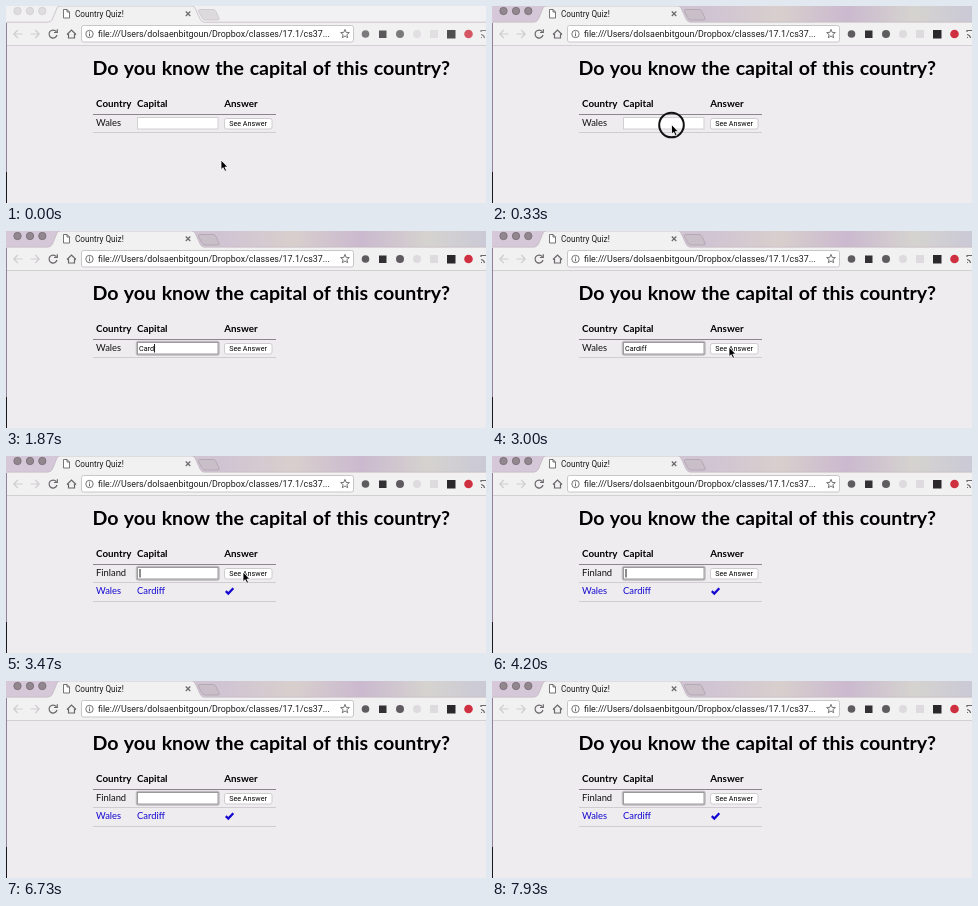
An HTML page that plays this animation: 480x197 px, repeating every 8 s.

```html
<!DOCTYPE html>
<html lang="en">
<head>
<meta charset="utf-8">
<title>Country Quiz!</title>
<style>
html, body { margin: 0; width: 100%; height: 100%; overflow: hidden; background: #eeecef; }
svg { display: block; width: 480px; height: 197px; }
text { white-space: pre; }
.ui { font-family: Roboto, "Liberation Sans", sans-serif; fill: #1c1c1c; }
.page { font: 9.4px Lato, "Open Sans", sans-serif; fill: #111; }
.head { font-weight: 700; font-size: 9.8px; fill: #000; }
.title { font-weight: 700; font-size: 19.58px; word-spacing: .9px; fill: #000; }
.small { font-size: 7.2px; fill: #000; }
.blue, .blue text { fill: #1408d0; }
.line { fill: none; stroke: #6a676a; stroke-width: 1.2; }
.faint { stroke: #cfcdcf; }
</style>
</head>
<body>
<svg viewBox="0 0 480 197">
  <defs>
    <linearGradient id="lit">
      <stop offset="0" stop-color="#d6c8d9"/>
      <stop offset=".45" stop-color="#d0c4d3"/>
      <stop offset=".6" stop-color="#d8cfcd"/>
      <stop offset=".74" stop-color="#cbb9cf"/>
      <stop offset=".88" stop-color="#d5d3cf"/>
      <stop offset="1" stop-color="#cac9d6"/>
    </linearGradient>
  </defs>

  <!-- window frame -->
  <rect width="480" height="197" fill="#eeecef"/>
  <rect id="strip" width="480" height="17"/>
  <g id="lights" stroke-width=".8">
    <circle cx="11.500" cy="5" r="3.700"/>
    <circle cx="24" cy="5" r="3.700"/>
    <circle cx="36.300" cy="5" r="3.700"/>
  </g>
  <path id="plus" d="M194 3.500H207Q209 3.500 210 5.500L213 12Q214 14 211 14H199Q197 14 196 12L192.500 5.500Q191.500 3.500 194 3.500Z" stroke-width=".8"/>
  <rect y="16" width="480" height="23" fill="#f2f1f2"/>
  <path d="M0 16.200H42Q45 16 46.500 13L51 2Q52 0 54 0H186Q188 0 189 2L194 13Q195.500 16 198 16.200H480" fill="#f2f1f2" stroke="#bdb4bc" stroke-width=".7"/>
  <path d="M0 39.500H480" stroke="#d3d0d3"/>
  <path d="M.5 17V166" stroke="#94809a"/>
  <path d="M.5 166V197" stroke="#1b171c"/>

  <!-- tab -->
  <path d="M57.500 3.500H61L63.500 6V12H57.500ZM61 3.500V6H63.500" fill="#fff" stroke="#555" stroke-width=".8"/>
  <text class="ui" x="69" y="10.700" font-size="8.200">Country Quiz!</text>
  <path class="line" d="M179.800 5.500L184.300 10M184.300 5.500L179.800 10"/>

  <!-- toolbar -->
  <path class="line faint" d="M16.500 28H8M11.800 24L7.800 28L11.800 32"/>
  <path class="line faint" d="M24.500 28H33M29.200 24L33.200 28L29.200 32"/>
  <path class="line" d="M50.300 25.600A4 4 0 1 0 51 29M51.300 23.300V26.500H48"/>
  <path class="line" d="M61 28.500L65.500 24L70 28.500M62.500 28V32H68.500V28"/>
  <rect x="75.500" y="19.500" width="272" height="16.500" rx="2" fill="#fff" stroke="#c9c6c9"/>
  <circle cx="83.500" cy="28" r="3.700" fill="none" stroke="#666" stroke-width=".9"/>
  <path d="M83.500 25.600V26.600M83.500 27.400V30.300" stroke="#666"/>
  <text class="ui" x="92" y="31" font-size="8.900">file:///Users/dolsaenbitgoun/Dropbox/classes/17.1/cs37...</text>
  <path id="star" fill="none" stroke="#666" stroke-width=".9"/>
  <g id="tools">
    <circle cx="359.500" cy="28" r="3.800" fill="#5e5c5e"/>
    <rect x="373" y="24.500" width="7.500" height="7.500" fill="#333133"/>
    <circle cx="394" cy="28" r="4" fill="#5e5c5e"/>
    <circle cx="411" cy="28" r="4" fill="#dddbdd"/>
    <rect x="424" y="24" width="8" height="8" fill="#dddbdd"/>
    <rect x="441" y="24" width="8.500" height="8.500" fill="#2a282a"/>
    <circle cx="462.500" cy="28" r="4.300" fill="#cf3040"/>
    <path class="line" d="M475 26V24.500H484M475 28.500A4 4 0 0 1 478.500 32M475 31.500H476"/>
  </g>

  <!-- page -->
  <g class="page">
    <text class="title" x="86.500" y="69.300">Do you know the capital of this country?</text>
    <text class="head" x="90" y="101">Country</text>
    <text class="head" x="131" y="101">Capital</text>
    <text class="head" x="218.300" y="101">Answer</text>
    <path d="M87 108.500H270" stroke="#8d858d"/>
    <path d="M87 126.500H270" stroke="#d0cdd0"/>
    <text id="country" x="90" y="119.500"></text>
    <g id="done" class="blue">
      <text x="90" y="137.500">Wales</text>
      <text x="131" y="137.500">Cardiff</text>
      <path d="M219.800 135.200L222.300 137.600L227.300 132.300" fill="none" stroke="#1408d0" stroke-width="2.300"/>
      <path d="M87 145.500H270" stroke="#d0cdd0"/>
    </g>
  </g>
  <rect id="glow" x="130.500" y="110.500" width="82.500" height="13.500" rx="2" fill="none" stroke="#bcbabd" stroke-width="1.500"/>
  <rect id="field" x="131.500" y="111.500" width="80.500" height="11.500" fill="#fff"/>
  <text id="typed" class="ui small" x="133" y="119.900"></text>
  <path id="caret" stroke="#000" stroke-width=".9"/>
  <rect id="button" x="218.500" y="112.500" width="47.500" height="10.500" rx="2" stroke="#cbc8cb" stroke-width=".9"/>
  <text class="ui small" x="223.200" y="120.300">See Answer</text>

  <!-- pointer -->
  <circle id="ring" r="12.300" fill="none" stroke="#111" stroke-width="2"/>
  <path id="pointer" d="M0 0V9.600L2.200 7.700L3.800 11.300L5.500 10.500L3.900 7.100H6.800Z" fill="#000" stroke="#fff" stroke-width=".8"/>
</svg>
<script>
const LOOP = 8000, FOCUS = 400, SOLVED = 3365;
const WORD = "Cardiff";
const KEYS = [1530, 1600, 1730, 1800, 1930, 2000, 2130];
// pointer stops: time, x, y
const STOPS = [
  [0, 215, 154], [70, 215, 154], [270, 179.5, 118.5], [2600, 179.5, 118.5],
  [2930, 237, 116], [3500, 237, 116], [3850, 226, 168], [LOOP, 226, 168]
];
const SHOWN = [[0, 900], [2600, 4100]];
const CLICKS = [[290, 480], [3130, 3365]];

const $ = id => document.getElementById(id);
const set = (id, attrs) => Object.entries(attrs).forEach(([k, v]) => $(id).setAttribute(k, v));
const show = (id, on) => set(id, { visibility: on ? "visible" : "hidden" });
const within = (t, spans) => spans.some(([a, b]) => t >= a && t < b);
const ease = p => p * p * (3 - 2 * p);

function pointerAt(t) {
  const i = STOPS.findIndex(s => s[0] > t);
  const [t0, x0, y0] = STOPS[i - 1], [t1, x1, y1] = STOPS[i];
  const p = ease((t - t0) / (t1 - t0));
  return [x0 + (x1 - x0) * p, y0 + (y1 - y0) * p];
}

function caretOn(t) {
  if (t < FOCUS) return false;
  if (t >= SOLVED) return t < 3665 || (t - 165) % 1000 < 500;
  const last = KEYS.filter(k => k <= t).pop() || FOCUS;
  return (t - last) % 1000 < 500;
}

// the window is inactive until its first click
function drawFrame(active) {
  set("strip", { fill: active ? "url(#lit)" : "#f1f0f2" });
  set("lights", active ? { fill: "#92878f", stroke: "#776c75" } : { fill: "#dedcde", stroke: "#d0ced0" });
  set("plus", active ? { fill: "#c9bfc9", stroke: "#aea3ad" } : { fill: "#dcdadc", stroke: "#c9c7c9" });
  set("tools", { opacity: active ? 1 : .8 });
}

function draw(t) {
  const solved = t >= SOLVED, focused = t >= FOCUS;
  drawFrame(t >= CLICKS[0][0]);
  $("country").textContent = solved ? "Finland" : "Wales";
  show("done", solved);

  const typed = solved ? "" : WORD.slice(0, KEYS.filter(k => k <= t).length);
  $("typed").textContent = typed;
  const end = 134 + (typed ? $("typed").getComputedTextLength() - .5 : 0);
  set("caret", { d: `M${end} 113V121.5` });
  show("caret", caretOn(t));
  show("glow", focused);
  set("field", { stroke: focused ? "#9c9a9d" : "#d3d0d3" });

  const [x, y] = pointerAt(t), click = within(t, CLICKS);
  set("button", { fill: click && t > 3000 ? "#e4e2e5" : "#fff" });
  set("pointer", { transform: `translate(${x} ${y})` });
  set("ring", { transform: `translate(${x} ${y + .5})` });
  show("pointer", within(t, SHOWN));
  show("ring", click);
}

const points = Array.from({ length: 10 }, (_, i) => {
  const a = i * Math.PI / 5 - Math.PI / 2, r = i % 2 ? 2 : 4.6;
  return `${339 + r * Math.cos(a)} ${28 + r * Math.sin(a)}`;
});
set("star", { d: `M${points.join("L")}Z` });

const start = performance.now();
function tick() {
  draw((performance.now() - start) % LOOP);
  requestAnimationFrame(tick);
}
tick();
</script>
</body>
</html>
```
